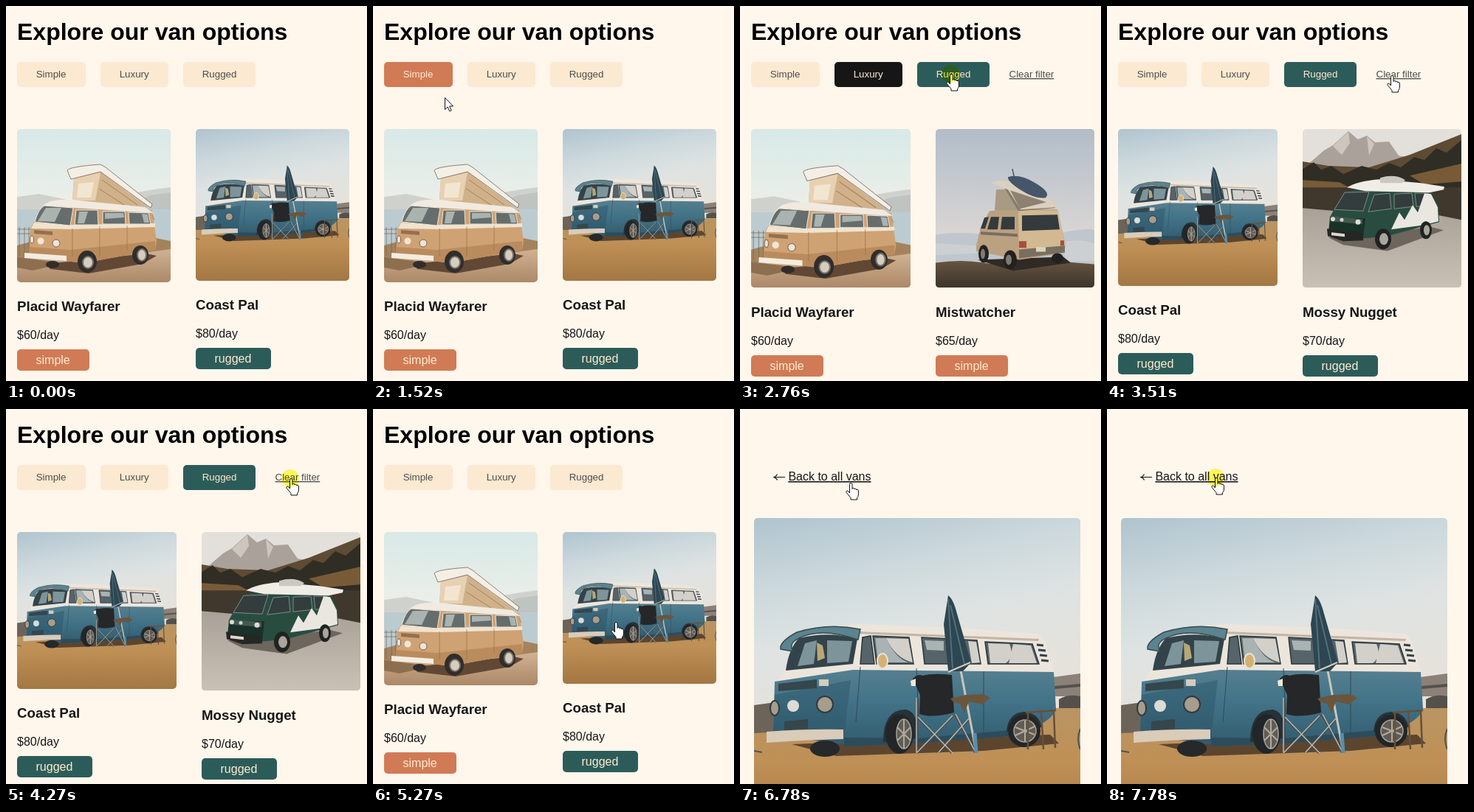
These frames come from a looping animation (489 px wide and 509 px high, 8000 ms). An HTML page:

```html
<!DOCTYPE html>
<html lang="en">
<head>
<meta charset="utf-8">
<title>Van options</title>
<style>
html, body { margin: 0; width: 100%; height: 100%; overflow: hidden; background: #fff6ec; }
svg { display: block; }
text { font: 16px "Liberation Sans", Arial, sans-serif; fill: #161616; }
.title { font-size: 32px; font-weight: bold; fill: #000; }
.name { font-size: 18.72px; font-weight: bold; }
.btn text, .clear { font-size: 13.333px; fill: #4d4d4d; }
.btn rect { fill: #fce9d1; }
.on text { fill: #ffead0; }
.simple rect { fill: #d07b55; }
.luxury rect { fill: #161616; }
.rugged rect { fill: #2c5c59; }
.tag text { fill: #ffead0; }
.link { text-decoration: underline 1px; text-underline-offset: 1px; }
.spot { mix-blend-mode: multiply; fill: #faff62; }

[data-a] { animation: 8s step-end infinite; }
[data-a=list] { animation-name: list; }
[data-a=all] { animation-name: all; }
[data-a=simple] { animation-name: simple; }
[data-a=rugged] { animation-name: rugged; }
[data-a=detail] { animation-name: detail; }
[data-a=b-simple] { animation-name: b-simple; }
[data-a=b-luxury] { animation-name: b-luxury; }
[data-a=b-rugged] { animation-name: b-rugged; }
[data-a=clear] { animation-name: clear; }
[data-a=move] { animation-name: move; }
[data-a=arrow] { animation-name: arrow; }
[data-a=hand] { animation-name: hand; }
[data-a=click] { animation-name: click; }

@keyframes list { 0% { opacity: 1 } 72.125%, to { opacity: 0 } }
@keyframes detail { 0% { opacity: 0 } 72.125%, to { opacity: 1 } }
@keyframes all { 0%, 56.5% { opacity: 1 } 22.125%, 72.125%, to { opacity: 0 } }
@keyframes simple { 0%, 37.625%, to { opacity: 0 } 22.125% { opacity: 1 } }
@keyframes rugged { 0%, 56.5%, to { opacity: 0 } 37.625% { opacity: 1 } }
@keyframes b-simple { 0%, 31.375%, to { opacity: 0 } 12.5% { opacity: 1 } }
@keyframes b-luxury { 0%, 37.625%, to { opacity: 0 } 25.125% { opacity: 1 } }
@keyframes b-rugged { 0%, 56.5%, to { opacity: 0 } 34.5% { opacity: 1 } }
@keyframes clear { 0%, 56.5%, to { opacity: 0 } 22.125% { opacity: 1 } }
@keyframes click {
  0%, 19%, 28.25%, 37.625%, 56.5% { opacity: 0 }
  15.625%, 25.125%, 34.5%, 53.375%, 97.25%, to { opacity: 1 }
}
@keyframes arrow {
  0%, 6.25%, 25.125%, 34.5%, 43.875%, 62.75%, 81.625%, to { opacity: 0 }
  3.125%, 19%, 28.25%, 40.75%, 56.5%, 72.125% { opacity: 1 }
}
@keyframes hand {
  0%, 19%, 28.25%, 40.75%, 56.5%, 72.125% { opacity: 0 }
  6.25%, 25.125%, 34.5%, 43.875%, 62.75%, 81.625%, to { opacity: 1 }
}
@keyframes move {
  0%, 3.125% { transform: translate(147px, 485px) }
  6.25% { transform: translate(62px, 476px) }
  9.375% { transform: translate(86px, 428px) }
  12.5% { transform: translate(66px, 98px) }
  15.625% { transform: translate(64px, 90px) }
  19% { transform: translate(97px, 124px) }
  22.125% { transform: translate(139px, 118px) }
  25.125% { transform: translate(176px, 92px) }
  28.25% { transform: translate(209px, 115px) }
  31.375% { transform: translate(229px, 116px) }
  34.5% { transform: translate(279px, 92px) }
  37.625% { transform: translate(290px, 94px) }
  40.75% { transform: translate(348px, 104px) }
  43.875% { transform: translate(379px, 94px) }
  56.5% { transform: translate(387px, 95px) }
  59.625% { transform: translate(376px, 148px) }
  62.75% { transform: translate(336px, 262px) }
  65.875% { transform: translate(322px, 289px) }
  72.125% { transform: translate(320px, 292px) }
  75.25% { transform: translate(312px, 278px) }
  78.375% { transform: translate(240px, 180px) }
  81.625% { transform: translate(154px, 104px) }
  84.75% { transform: translate(143px, 100px) }
  87.875% { transform: translate(142px, 96px) }
  91%, to { transform: translate(141px, 93px) }
}
</style>
</head>
<body>
<svg width="489" height="509" viewBox="0 0 489 509">
<defs>
  <linearGradient id="sky1" x2=".3" y2="1"><stop stop-color="#afc4ce"/><stop offset=".3" stop-color="#ccd8dc"/><stop offset=".55" stop-color="#dee3e2"/><stop offset="1" stop-color="#e8e2d9"/></linearGradient>
  <linearGradient id="paint" x2="0" y2="1"><stop stop-color="#557f8f"/><stop offset=".4" stop-color="#437488"/><stop offset="1" stop-color="#335c70"/></linearGradient>
  <linearGradient id="grass" x2="0" y2="1"><stop stop-color="#b99562"/><stop offset=".4" stop-color="#bf9056"/><stop offset="1" stop-color="#a37743"/></linearGradient>
  <linearGradient id="sky2" x2="0" y2="1"><stop stop-color="#d8e9e7"/><stop offset="1" stop-color="#f1f0e9"/></linearGradient>
  <linearGradient id="road" x2="0" y2="1"><stop stop-color="#d0b292"/><stop offset="1" stop-color="#ab8868"/></linearGradient>
  <linearGradient id="sky3" x2="0" y2="1"><stop stop-color="#b2bdc8"/><stop offset="1" stop-color="#dcd8d5"/></linearGradient>
  <linearGradient id="dirt" x2="0" y2="1"><stop stop-color="#66543f"/><stop offset="1" stop-color="#3c342c"/></linearGradient>
  <linearGradient id="gravel" x2="0" y2="1"><stop stop-color="#a9a197"/><stop offset="1" stop-color="#c9c1b6"/></linearGradient>

  <symbol id="blue" viewBox="19 148 442 438" preserveAspectRatio="none">
    <path fill="url(#sky1)" d="M19 148H461V450H19Z"/>
    <path fill="#6c6459" d="M19 402L48 398V440H19Z"/>
    <path fill="#8b8178" d="M424 364L461 359V390H424Z"/>
    <path fill="#55504b" d="M426 376L461 373V377L426 380ZM432 394Q445 386 461 390V406H432Z"/>
    <path fill="url(#grass)" d="M19 440L240 430 426 406H461V586H19Z"/>
    <path fill="#5b452f" d="M70 455L200 450 420 442 432 454 330 464 130 471Z"/>
    <path fill="#ece5dc" d="M66 345L80 305Q120 294 160 292L300 297 404 305Q411 309 414 320L426 358 150 362 48 372Z"/>
    <path fill="#c4b5a2" d="M160 302L405 312 404 315 160 305Z"/>
    <path fill="url(#paint)" d="M47 370L153 354 425 357 428 407Q420 432 355 443L238 452 140 455 45 442Z"/>
    <path fill="#2c5266" opacity=".45" d="M47 388L150 368 140 452 45 442Z"/>
    <path fill="#2b4c5c" d="M141 446L240 447 366 436V444L238 454 141 458Z"/>
    <path fill="#33434a" d="M62 355Q66 325 80 311 120 301 159 312L153 346Z"/>
    <path fill="#7d959a" d="M88 318L104 314 100 346 78 349ZM118 314L152 315 147 343 118 345Z"/>
    <path fill="#b8a877" d="M104 317L112 321 115 338 105 342Z"/>
    <path fill="#5a8490" stroke="#39494e" stroke-width="1.5" d="M55 326Q53 316 77 303 120 290 163 299L160 313Q110 296 80 311 65 318 72 329Z"/>
    <path fill="#566469" stroke="#29363b" stroke-width="1.5" d="M166 310L177 308 182 346H163ZM180 308L229 310 235 346H185ZM246 310L321 314 326 346H250ZM332 316L396 319 405 346H336Z"/>
    <path fill="#a9b3b4" d="M183 311L198 311Q210 338 228 344H187ZM250 314L276 315V328L253 327Z"/>
    <path fill="#d3d0ca" d="M198 311L228 312 234 344Q210 338 198 311ZM309 315L320 316 325 344 314 345ZM336 318L365 319Q372 336 360 345H339ZM370 319L394 321 402 345H364Z"/>
    <path stroke="#334249" stroke-width="3" d="M402 320L411 321M404 327L414 328M406 334L416 335M408 341L418 342"/>
    <path fill="none" stroke="#2f4b59" d="M163 350L157 425M239 352L242 420M330 356V440"/>
    <path fill="#35464d" d="M52 373L104 367V379L52 383ZM60 424L92 421V434L60 437Z"/>
    <path fill="#d4ccbc" d="M107 367H120V376H107Z"/>
    <circle cx="72" cy="403" r="8" fill="#dedcd4"/>
    <g fill="#a79d8d" stroke="#303a3e" stroke-width="2"><ellipse cx="47" cy="406" rx="6" ry="10"/><circle cx="115" cy="401" r="11"/></g>
    <path fill="#d9ccb9" d="M36 438Q90 434 140 435V448Q90 449 36 453Z"/>
    <ellipse cx="115" cy="461" rx="20" ry="11" fill="#26282a"/>
    <path fill="#263238" d="M194 452Q194 407 225 408 243 412 240 447ZM361 438Q363 412 385 411 404 412 409 432Z"/>
    <g fill="#222629"><ellipse cx="216" cy="441" rx="19" ry="27"/><circle cx="385" cy="437" r="22"/></g>
    <g fill="#605c55" stroke="#a9a397" stroke-width="1.5"><ellipse cx="222" cy="441" rx="10" ry="20"/><circle cx="386" cy="437" r="15"/></g>
    <path stroke="#b0aa9e" stroke-width="2" d="M222 421V461M213 432L231 450M213 450L231 432M386 423V451M373 432L399 442M373 443L399 431"/>
    <ellipse cx="193" cy="342" rx="7" ry="10" fill="#d5b171" stroke="#e8e2d7" stroke-width="2"/>
    <path fill="none" stroke="#4a4d4d" stroke-width="3" d="M240 392V466M240 418L287 467M289 416L240 467M291 414L318 466M311 420L270 466"/>
    <path fill="none" stroke="#bcb8ae" stroke-width="1.5" d="M239 392V466M241 418L288 467M288 416L239 467M292 414L319 466M310 420L269 466"/>
    <path stroke="#c9c5bb" stroke-width="3" d="M299 355L320 466"/>
    <path fill="#252729" d="M234 366Q241 359 247 362 262 358 287 361L290 412Q260 420 243 414L244 388Z"/>
    <path fill="#6b553b" d="M285 393L306 388 330 387 339 392 328 401 310 397 304 413 298 400 289 398Z"/>
    <path fill="#eee7db" d="M231 369L238 366V376H232Z"/>
    <path fill="#2d4651" d="M282 253Q289 258 294 278L313 344 302 356H282L276 292Z"/>
    <path fill="none" stroke="#4f707a" stroke-width="2" d="M282 258L288 352M285 266L304 346"/>
    <path fill="none" stroke="#d6cdbd" stroke-width="2" d="M282 357L312 344"/>
    <path stroke="#558fae" stroke-width="5" d="M318 440L320 467"/>
    <path fill="none" stroke="#66503b" stroke-width="2.5" d="M387 412L428 409M390 412V462M408 411L411 462M425 410L427 460"/>
    <path fill="none" stroke="#4d5455" stroke-width="2" d="M461 434Q455 448 461 462M19 464L30 466"/>
  </symbol>

  <symbol id="tan" viewBox="15 167 208 208" preserveAspectRatio="none">
    <path fill="url(#sky2)" d="M15 167H223V290H15Z"/>
    <path fill="#cfd2cc" d="M15 259L45 255 78 262 100 268 165 255 200 249 223 246V282H15Z"/>
    <path fill="#bfc4c1" d="M160 274L195 257 223 253V282H160Z"/>
    <path fill="#bccbd0" d="M15 276H223V326H15Z"/>
    <path fill="#a4835c" d="M15 325L40 318 203 315 223 319V348H15Z"/>
    <path fill="url(#road)" d="M15 342L120 344 223 330V375H15Z"/>
    <path fill="#8d6f50" d="M15 341L80 349 36 359 15 355Z"/>
    <path fill="#614834" d="M55 350L190 336 204 339 185 350 112 363 60 357Z"/>
    <path fill="none" stroke="#716653" stroke-width=".7" d="M15 303H34M15 309H34M18 300V339M25 300V339M31 300V339"/>
    <path fill="#d0b18a" d="M92 233L128 225 192 273 90 264Z"/>
    <path fill="#e7d1b2" d="M92 234L128 226 121 264 90 264Z"/>
    <path fill="#f2e6d1" d="M98 241L119 239 115 260 96 260Z"/>
    <path fill="none" stroke="#a38460" d="M130 236L178 270M126 248L160 270"/>
    <path fill="#f4efe6" stroke="#756452" stroke-width=".8" d="M83 223Q86 218 128 215L135 219 198 269 196 274 128 225 88 235Z"/>
    <path fill="#cfa274" d="M33 302L50 272 90 268 198 277 204 319 202 331 105 349 31 340Z"/>
    <path fill="#ba8b5d" d="M32 327L87 331 202 319V331L105 349 31 340Z"/>
    <path fill="#f1eae0" d="M50 271Q60 261 90 263L188 273 200 281 124 276Z"/>
    <path fill="#f0e3cf" d="M38 294L88 297 202 295V300L88 303 34 302Z"/>
    <path fill="#656e6d" stroke="#f0e6d7" d="M39 293Q44 275 52 271L91 274 87 298ZM95 277H124L125 297H93ZM131 279H161L162 296H131ZM166 280L193 281 196 296H167Z"/>
    <path fill="#aab3af" d="M54 274L75 274 66 293 43 292ZM99 279H111L106 295H97ZM134 281H159L160 287 134 289ZM184 282L192 283 194 294H187Z"/>
    <path fill="none" stroke="#9b7149" stroke-width=".7" d="M90 302V340M127 299V340M164 298V332M198 284L201 290"/>
    <path fill="#947050" d="M38 304L63 306V311L38 309Z"/>
    <circle cx="47" cy="319" r="4.5" fill="#f0e6d6"/>
    <g fill="#ede5d9" stroke="#806145"><circle cx="68" cy="322" r="5"/><ellipse cx="35" cy="317" rx="2.5" ry="5"/></g>
    <path fill="#f4ecdf" d="M25 335L82 339V346L25 342Z"/>
    <g fill="#302d2b"><ellipse cx="63" cy="351" rx="9" ry="5"/><ellipse cx="110" cy="347" rx="13" ry="15"/><ellipse cx="182" cy="338" rx="11" ry="13"/></g>
    <g fill="#d6cdbf" stroke="#777067" stroke-width="2"><ellipse cx="111" cy="348" rx="7" ry="8"/><ellipse cx="184" cy="338" rx="6" ry="8"/></g>
  </symbol>

  <symbol id="dusk" viewBox="265 167 215 215" preserveAspectRatio="none">
    <path fill="url(#sky3)" d="M265 167H480V320H265Z"/>
    <path fill="#bfc6cd" d="M265 310Q300 305 340 311T430 308 480 305V355H265Z"/>
    <path fill="#ccd0d3" d="M440 320Q460 315 480 322V346H440ZM265 322L320 325V335L265 338Z"/>
    <path fill="url(#dirt)" d="M265 348Q300 343 330 348T430 346L480 350V382H265Z"/>
    <path fill="#302a25" d="M322 344L438 340 448 348 370 359Z"/>
    <path fill="#baa180" d="M320 325L326 300 338 278 374 274 430 276 441 324 438 335 378 344 320 332Z"/>
    <path fill="#d2b992" d="M377 277L430 277 441 325 438 335 378 341Z"/>
    <path fill="#a99a84" d="M347 249L370 248 376 277 345 277Z"/>
    <path fill="#857a6b" d="M355 241L427 266V274L377 278Z"/>
    <path fill="#d9d0bf" d="M340 240Q352 234 367 239L427 266 428 273 380 276 363 249Z"/>
    <path fill="#8d8172" d="M366 250L415 266 379 275Z"/>
    <path fill="none" stroke="#47423d" stroke-width="1.3" d="M369 221L372 235"/>
    <path fill="#45566a" d="M363 232Q378 227 400 240T414 260Q400 262 381 250T363 232Z"/>
    <path fill="#343a3d" d="M340 286H351L349 303H335ZM355 286H372L372 303H353ZM331 287L337 286 332 302H326ZM382 284L430 283 433 303 382 305Z"/>
    <path fill="#786e62" d="M326 306L376 309V313L326 310ZM378 330L440 325V334L378 342Z"/>
    <path fill="#a74e39" d="M378 319H388V328H378ZM434 318H439V325H434Z"/>
    <path fill="#ddd4b8" d="M401 327H414V333H401Z"/>
    <g fill="#22211f"><ellipse cx="330" cy="336" rx="7" ry="12"/><ellipse cx="366" cy="344" rx="9" ry="13"/><ellipse cx="430" cy="342" rx="8" ry="7"/></g>
    <g fill="#817b70"><ellipse cx="329" cy="336" rx="3" ry="7"/><ellipse cx="364" cy="344" rx="4" ry="7"/></g>
  </symbol>

  <symbol id="green" viewBox="265 167 215 215" preserveAspectRatio="none">
    <path fill="#e3e0db" d="M265 167H480V250H265Z"/>
    <path fill="#aaa29a" d="M272 215L294 196 306 189 327 170 340 181 352 176 363 185 382 184 395 203 425 209V235H272Z"/>
    <path fill="#cec6bc" d="M306 190L327 171 329 186 318 202ZM352 177L362 187 355 203Z"/>
    <path fill="#5e4b34" d="M265 211L300 217 355 219 410 202 480 174V258H265Z"/>
    <path fill="#302d24" d="M265 221L280 212 290 222 304 217 320 228 345 217 365 222 382 213 398 219 416 205 430 209 446 193 460 199 480 182V282H265Z"/>
    <path fill="#785b36" d="M265 236L315 239 330 247H265ZM410 230L480 214V238L430 242Z"/>
    <path fill="#41382d" d="M265 246H480V292H265Z"/>
    <path fill="url(#gravel)" d="M265 274L310 278 450 284 480 290V382H265Z"/>
    <path fill="#6d665d" d="M300 314L440 300 456 304 380 332 320 324Z"/>
    <path fill="#294c40" d="M302 286L321 252 352 247 438 250 449 270 450 293 380 312 320 318 300 307Z"/>
    <path fill="#193128" d="M303 286L350 288 347 314 320 318 300 307Z"/>
    <path fill="#f0ede7" d="M325 246Q340 237 370 235L425 240 457 245 456 249 437 253 350 251Z"/>
    <path fill="#c9c8c1" d="M370 233Q390 227 404 236L400 240H370Z"/>
    <path fill="#343d3d" stroke="#a3aaa3" stroke-width=".7" d="M308 276L322 253 355 252 347 278ZM362 256L383 254 385 275 354 279ZM389 255L413 254 415 272 389 275ZM417 254L435 254 443 270 419 272Z"/>
    <path fill="#e9e7e0" d="M385 303L396 280 403 290 414 270 421 280 430 254 439 255 448 273 449 292 430 297Z"/>
    <path fill="#435a51" d="M303 285L346 289V296L303 292Z"/>
    <circle cx="318" cy="290" r="2.5" fill="#d1d3cc"/>
    <g fill="#dedbd1"><circle cx="306" cy="289" r="3"/><circle cx="340" cy="293" r="3.5"/><path d="M302 305H322V310H302Z"/></g>
    <path fill="#252725" d="M298 302L347 308V318L320 319 299 312Z"/>
    <path fill="#ddd8cc" d="M304 307L322 309V313L304 311Z"/>
    <g fill="#202321"><ellipse cx="374" cy="316" rx="11" ry="14"/><ellipse cx="432" cy="304" rx="8" ry="12"/></g>
    <g fill="#aaa69c"><ellipse cx="375" cy="316" rx="6" ry="8"/><ellipse cx="433" cy="304" rx="4" ry="7"/></g>
  </symbol>
</defs>

<rect width="489" height="509" fill="#fff6ec"/>
<g data-a="list">
  <text class="title" x="15" y="46">Explore our van options</text>
  <g id="buttons"></g>
  <text class="clear link" data-a="clear" x="364.5" y="97">Clear filter</text>
  <g id="all" data-a="all"></g>
  <g id="simple" data-a="simple"></g>
  <g id="rugged" data-a="rugged"></g>
</g>
<g id="detail" data-a="detail">
  <path fill="none" stroke="#161616" stroke-width="1.2" d="M61 92.5H46.5M50.5 88.5Q49 91.5 46 92.5 49 93.5 50.5 96.5"/>
  <text class="link" x="65.4" y="97">Back to all vans</text>
</g>
<g data-a="move" fill="#fff" stroke="#111" stroke-linejoin="round">
  <path data-a="arrow" d="M.5 .5V16.5L4.2 13 6.8 18.8 9.2 17.7 6.7 12H11.5Z"/>
  <path data-a="hand" d="M5.5 14V2.2Q5.5 .5 7.2 .5T9 2.2V8.5Q9 7.3 10.5 7.3T12 9Q12 8.2 13.3 8.2T14.7 10Q15 9.2 16 9.2T17.4 11V16Q17.4 19 15.5 20.5V23H7V20.5Q4 17 1 13.2 .4 11.8 1.6 11.2T4 12Z"/>
</g>
<g class="spot" data-a="click"><circle data-a="move" cx="6" r="12"/></g>
</svg>
<script>
const add = (id, html) => document.getElementById(id).insertAdjacentHTML('beforeend', html);
const box = (x, y, w, h) => `<rect x="${x}" y="${y}" width="${w}" height="${h}" rx="5"/>`;
const label = (x, y, s, cls = '') => `<text class="${cls}" x="${x}" y="${y}">${s}</text>`;

let clips = 0;
function photo(id, x, y, w, h) {
  const clip = 'clip' + clips++;
  return `<clipPath id="${clip}">${box(x, y, w, h)}</clipPath><g clip-path="url(#${clip})">
    <use href="#${id}" x="${x}" y="${y}" width="${w}" height="${h}"/></g>`;
}

const vans = {
  tan: ['Placid Wayfarer', 60, 'simple'],
  blue: ['Coast Pal', 80, 'rugged'],
  dusk: ['Mistwatcher', 65, 'simple'],
  green: ['Mossy Nugget', 70, 'rugged']
};

function card(list, id, x, w, h) {
  const [name, price, kind] = vans[id], y = 167 + Math.round(h);
  add(list, photo(id, x, 167, w, h) +
    label(x, y + 39, name, 'name') +
    label(x, y + 77, `$${price}/day`) +
    `<g class="tag ${kind}">${box(x, y + 91, kind === 'simple' ? 98 : 102, 29)}` +
    label(x + 25.5, y + 111, kind) + '</g>');
}

for (const [name, x, w] of [['Simple', 15, 93], ['Luxury', 128, 92], ['Rugged', 240, 98]]) {
  const kind = name.toLowerCase(), body = box(x, 76, w, 34) + label(x + 25.7, 97, name);
  add('buttons', `<g class="btn">${body}</g>
    <g class="btn on ${kind}" data-a="b-${kind}">${body}</g>`);
}

card('all', 'tan', 15, 208, 208);
card('all', 'blue', 257, 208, 206);
card('simple', 'tan', 15, 216, 215.5);
card('simple', 'dusk', 265, 215, 215.5);
card('rugged', 'blue', 15, 216, 213);
card('rugged', 'green', 265, 215, 215.5);
add('detail', photo('blue', 19, 148, 442, 438));
</script>
</body>
</html>
```
